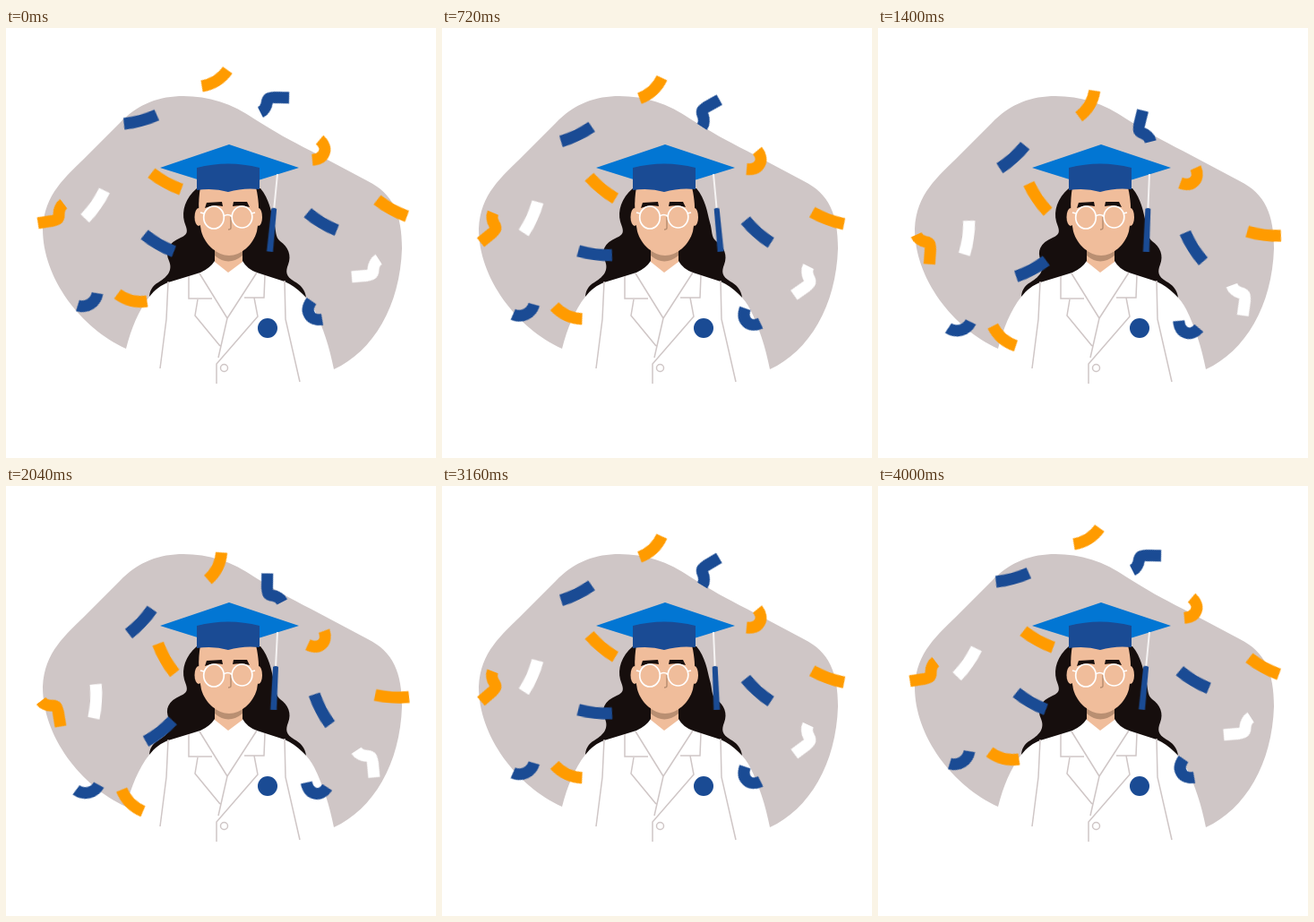
Animation of 480x480 px, one loop 4040 ms. Source, as an HTML page:

```html
<!DOCTYPE html>
<html lang="en">
<head>
<meta charset="utf-8">
<title>Graduate with confetti</title>
<style>
  html, body { margin: 0; width: 100%; height: 100%; overflow: hidden; background: #fff; }
  svg { display: block; width: 100vw; height: 100vh; }
  .seam { fill: none; stroke: #cfc6c6; stroke-width: 1.5; }
  .glasses { fill: none; stroke: #fff; stroke-width: 1.7; }
  .confetti path, .tassel { animation: drift 4.04s cubic-bezier(.333, 0, .667, 1) infinite; }
  .confetti path { fill: none; stroke-width: 13; stroke-linejoin: round; transform: var(--home); }
  .tassel { animation-name: swing; transform: rotate(5.6deg); }
  @keyframes drift {
    46.5% { transform: var(--far); }
    99%, 100% { transform: var(--home); }
  }
  @keyframes swing {
    20.8%, 66.3% { transform: rotate(-6deg); }
    42.6% { transform: rotate(6deg); }
    99%, 100% { transform: rotate(5.6deg); }
  }
</style>
</head>
<body>
<svg viewBox="0 0 480 480">
  <path fill="#cfc6c6" d="M134 358C84 335 41 280 41 224C43 185 66 167 90 143L127 106C148 84 172 76 198 76C226 76 252 84 278 102C300 116 318 126 340 137L404 171C432 185 442 208 442 246C440 310 410 361 366 381Z"/>

  <!-- hair -->
  <path fill="#160e0d" d="M213 179C200 190 196 204 199 216C202 225 205 230 195 234C181 240 177 249 182 260C187 272 178 279 170 284C163 288 160 294 160 301L248 290L335 301C334 292 329 287 322 283C312 277 312 272 315 264C319 254 315 244 306 238C300 233 302 226 299 217C296 205 294 191 284 179Z"/>

  <!-- coat -->
  <path fill="#fff" d="M134 358C140 335 148 315 160 300C166 292 173 287 181 284L204 277L217 273Q228 268 233 260H264Q269 269 280 273L311 283C326 290 338 302 344 314C354 334 361 356 366 381V402H134Z"/>

  <!-- neck and face -->
  <path fill="#f0bd9b" d="M233 240H264V261L248 273L233 261Z"/>
  <path fill="#b98f72" d="M233 247H264V254Q248 267 233 254Z"/>
  <ellipse fill="#f0bd9b" cx="215" cy="211" rx="4.5" ry="10"/>
  <ellipse fill="#f0bd9b" cx="282" cy="211" rx="4" ry="10"/>
  <path fill="#f0bd9b" d="M217 178H279C283 194 283 211 280 227C276 242 262 254 249 254C236 254 222 242 218 227C215 211 214 194 217 178Z"/>
  <path fill="#160e0d" d="M222 201L224 195L241 194L242 199Q231 197 222 201ZM253 199L254 194L269 194L272 200Q263 197 253 199Z"/>
  <path fill="none" stroke="#b98f72" stroke-width="1.5" d="M251 211V223Q251 225 248 225"/>
  <g class="glasses">
    <ellipse cx="232" cy="211.500" rx="11.3" ry="12.5"/>
    <ellipse cx="263.500" cy="211" rx="11.3" ry="12"/>
    <path d="M243 210Q247.500 207 252 210M221 207L217 206M274 207L278 206"/>
  </g>

  <path class="seam" d="M204 277V302H230M216 274L247 324L280 273M289 276L288 301H266M214 303L211 321L239 355M277 301L281 322L235 375V397M247 324L237 368M181 283L179 325L172 380M311 282L312 325L328 395"/>
  <circle class="seam" cx="243.500" cy="379.500" r="4"/>
  <circle fill="#1a4b94" cx="292" cy="335" r="11"/>

  <!-- cap -->
  <path fill="#0276d3" d="M172 156L249 130L327 156L249 180Z"/>
  <path fill="#1a4b94" d="M213 156Q248 147 283 156V180Q265 178 248 183Q231 178 213 181Z"/>
  <g transform="translate(303 163)">
    <g class="tassel">
      <path fill="none" stroke="#fff" stroke-width="1.6" d="M0 0V40"/>
      <path fill="#1a4b94" d="M-3 39Q0 37 3 39L3.500 87H-3.500Z"/>
    </g>
  </g>

  <g class="confetti"></g>
</svg>
<script>
  const orange = '#ff9b00', blue = '#1a4b94', white = '#fff';

  // Strips are centred on the origin with their ends on the x axis.
  const bow = 'M-19 0Q0 3 19 0';
  const curl = 'M-17 0Q0 7 17 0';
  const fold = 'M-18 0L-3 8Q3 11 6 7Q11 0 18 0';
  const hook = 'M-12 0C-6 13 7 13 12 0';
  const crescent = 'M-13 0C-6 8 6 8 13 0';

  const layer = document.querySelector('.confetti');
  const pose = (x, y, angle) => `translate(${x}px, ${y}px) rotate(${angle}deg)`;

  // Folds tumble; other strips turn further the way they lean unless told otherwise.
  const usualTurn = (shape, angle) => shape === fold ? -92 : 32 * Math.sign(angle);

  function addStrip(shape, color, x, y, angle, { fall = 34, turn = usualTurn(shape, angle) } = {}) {
    const strip = document.createElementNS('http://www.w3.org/2000/svg', 'path');
    strip.setAttribute('d', shape);
    strip.style.stroke = color;
    strip.style.setProperty('--home', pose(x, y, angle));
    strip.style.setProperty('--far', pose(x, y + fall, angle + turn));
    layer.append(strip);
  }

  addStrip(curl, orange, 233, 56, -32);
  addStrip(curl, orange, 141, 301, 14, { fall: 51 });

  addStrip(bow, blue, 150, 102, -15, { fall: 50 });
  addStrip(bow, white, 99, 197, -55, { fall: 44 });
  addStrip(bow, orange, 179, 171, 29, { fall: 22 });
  addStrip(bow, blue, 353, 216, 31);
  addStrip(bow, blue, 171, 240, 30, { turn: -69 });
  addStrip(bow, orange, 431, 201, 29, { turn: -26 });

  addStrip(fold, orange, 50, 207, -37, { fall: 48 });
  addStrip(fold, white, 401, 268, -33, { fall: 43 });
  addStrip(fold, blue, 300, 86, 153, { fall: 28 });

  addStrip(hook, orange, 346, 136, -70, { turn: 30 });
  addStrip(hook, blue, 347, 315, 60, { turn: -48, fall: 19 });
  addStrip(crescent, blue, 91, 303, -32, { turn: 20 });
</script>
</body>
</html>
```
